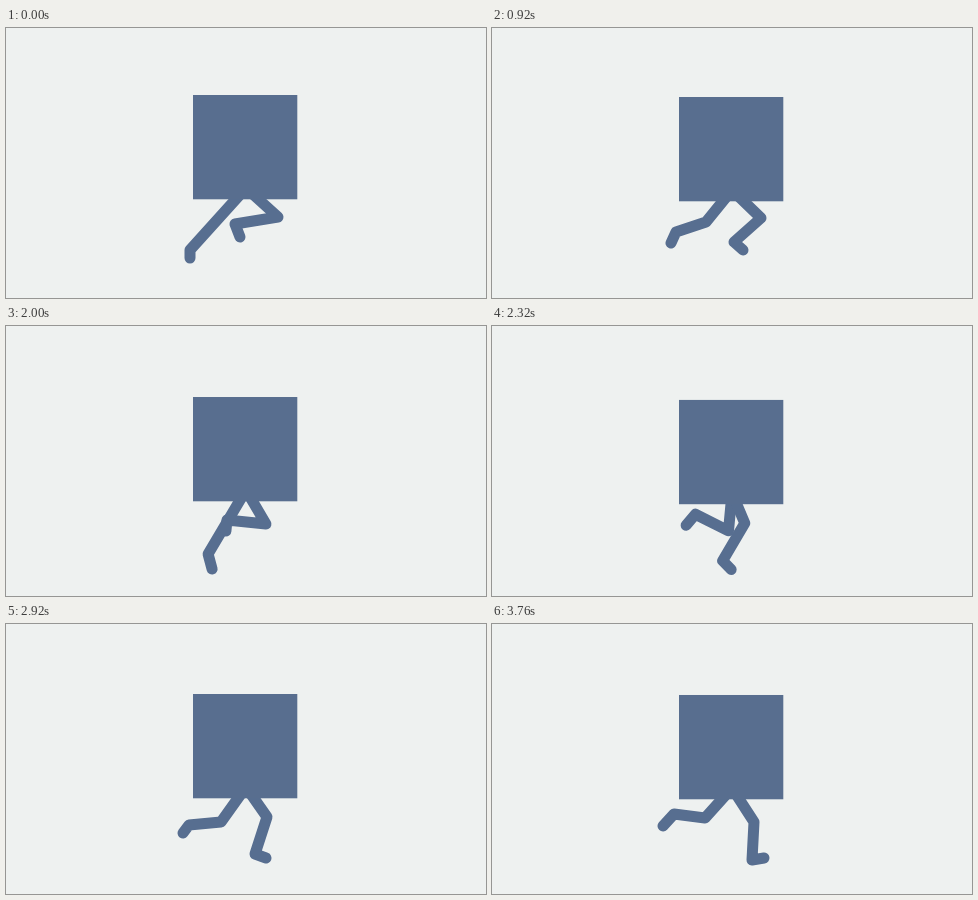
An HTML page that plays this animation: 480x270 px, repeating every 3800 ms.

```html
<!DOCTYPE html>
<html lang="en">
<head>
<meta charset="utf-8">
<title>Running square</title>
<style>
  html, body { margin: 0; width: 100%; height: 100%; overflow: hidden; background: #eef1f0; }
  svg { display: block; width: 480px; height: 270px; }
  polyline { fill: none; stroke: #576e90; stroke-width: 11; stroke-linecap: round; stroke-linejoin: round; }
</style>
</head>
<body>
<svg viewBox="0 0 480 270">
  <rect width="480" height="270" fill="#eef1f0"/>
  <g id="runner">
    <polyline id="legA"/>
    <polyline id="legB"/>
    <rect x="187" y="0" width="104.3" height="104.3" fill="#586e8f"/>
  </g>
</svg>
<script>
const LOOP = 3800, FRAME = 40;
const HIP = [240, 93];

// One step of the run: phase and height of the body.
const beats = [0, 0.075, 0.207, 0.263, 0.523, 0.741, 0.875];
const heights = [69, 70, 71, 72.6, 74, 71, 67];

// Knee, ankle and toe, measured from the top of the body.
const stance = [
  [269, 121, 242, 145, 251, 153],
  [261, 123, 249, 160, 260, 164],
  [262, 127, 260, 165, 272, 163],
  [261, 120.5, 254, 158.5, 266, 160.5],
  [255, 123, 234, 161, 243, 169],
  [221, 125, 202, 157, 206, 172],
  [212, 124, 184, 155, 184, 163]
];
const swing = [
  [214, 125, 184, 135, 179, 146],
  [215, 128, 183, 131, 177, 139],
  [213, 123, 182, 119, 171, 131],
  [221, 127.5, 184, 121.5, 172, 129.5],
  [234, 131, 201, 114, 191, 125],
  [260, 127, 221, 123, 220, 134],
  [272, 122, 229, 129, 234, 142]
];

// Smooth periodic curve through the keys, without overshoot.
function curve(times, values, period) {
  const n = times.length;
  const wrap = i => (i % n + n) % n;
  const at = i => times[wrap(i)] + Math.floor(i / n) * period;
  const val = i => values[wrap(i)];
  const slope = i => (val(i + 1) - val(i)) / (at(i + 1) - at(i));
  const tangent = i => {
    const a = slope(i - 1), b = slope(i);
    return a * b <= 0 ? 0 : 2 * a * b / (a + b);
  };
  return x => {
    x = (x % period + period) % period;
    let i = n - 1;
    while (times[i] > x) i--;
    const h = at(i + 1) - at(i), u = (x - at(i)) / h, v = 1 - u;
    return val(i) * v * v * (1 + 2 * u) + val(i + 1) * u * u * (3 - 2 * u)
      + h * u * v * (tangent(i) * v - tangent(i + 1) * u);
  };
}

const bob = curve(beats, heights, 1);
const stride = [...beats, ...beats.map(b => b + 1)];
const poses = [...stance, ...swing];
const joints = HIP.concat(poses[0]).slice(2)
  .map((_, j) => curve(stride, poses.map(p => p[j]), 2));

// The run starts a little slower, then keeps an even pace.
function phaseAt(ms) {
  const f = ms / FRAME - 23;
  return f < 0 ? 4 + f * 2.125 / 23 : 4 + f * 0.1015;
}

const runner = document.getElementById("runner");
const legs = ["legA", "legB"].map(id => document.getElementById(id));

function draw(ms) {
  const phase = phaseAt(ms);
  runner.setAttribute("transform", `translate(0 ${bob(phase).toFixed(2)})`);
  legs.forEach((leg, k) => {
    const pts = [...HIP, ...joints.map(f => f(phase + k))];
    leg.setAttribute("points", pts.map(v => v.toFixed(2)).join(" "));
  });
}

const start = performance.now();
function tick() {
  const ms = (performance.now() - start) % LOOP;
  draw(Math.floor(ms / FRAME) * FRAME);
  requestAnimationFrame(tick);
}
draw(0);
requestAnimationFrame(tick);
</script>
</body>
</html>
```
